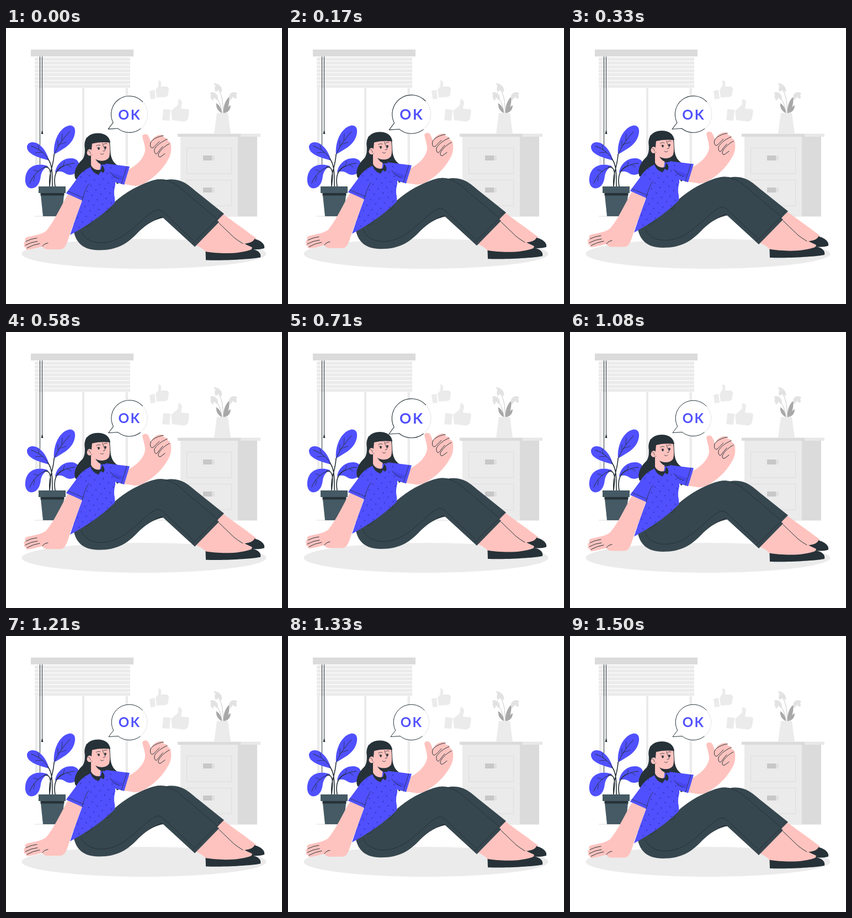
An HTML page for the animation above (1540 ms loop, 500x500 px).

```html
<!DOCTYPE html>
<html lang="en">
<head>
<meta charset="utf-8">
<title>OK</title>
<style>
  html, body { margin: 0; width: 100%; height: 100%; overflow: hidden; background: #fff; }
  svg { display: block; width: 100%; height: 100%; }
  .g1 { fill: #ebebeb; }
  .g2 { fill: #dbdbdb; }
  .blue { fill: #5050ff; }
  .skin { fill: #ffc3bf; }
  .pants { fill: #37474f; }
  .dark { fill: #263238; }
  .line { fill: none; stroke: #263238; stroke-width: 1; stroke-linecap: round; stroke-linejoin: round; }
  .thin { stroke-width: .8; }
  .stem { stroke-width: 1.6; }
  .pale { fill: none; stroke: #dcdcdc; stroke-width: 1; }
  text { font: 700 24px Lato, "Open Sans", sans-serif; letter-spacing: 2.5px; }
</style>
</head>
<body>
<svg viewBox="0 0 500 500">
  <defs>
    <pattern id="dots" width="16" height="18" patternUnits="userSpaceOnUse" patternTransform="translate(5 3) rotate(-8)">
      <g fill="#3434c4"><circle cx="4" cy="4" r="1.2"/><circle cx="12" cy="13" r="1.2"/></g>
    </pattern>
    <path id="torso" d="M157 251C142 256 132 266 126 277L109 300L138 313L128 340L116 375.500C143 361 175 340 197 317.500C199 309 193 303 198 285L198 262C192 250 184 247 176 248z"/>
  </defs>

  <!-- window -->
  <path class="g1" d="M53 109h4v139h-4zM138 109h4v139h-4zM216.500 109h4.500v139h-4.500z"/>
  <g id="slats" class="g1"></g>
  <path class="g2" d="M45 39H231V51.500H45z"/>
  <path class="line" d="M61.500 52V247M65.500 52V188"/>
  <path class="dark" d="M64.800 186h1.400l1.200 6h-3.800z"/>

  <!-- background thumbs -->
  <g class="g1">
    <path d="M260 114l9-2 2 16-9 1z"/>
    <path d="M271 112l4-5c2-4 1-8 1-12q5 0 5.500 5l-1 6 10.500 0q4 1 4 5l-1.500 10q-1.500 4-5.500 4l-15 1z"/>
    <path d="M285 147l13 1-2 20-13-1z"/>
    <path d="M299 150l11-9c3-5 1-9 3-12q5 0 6 6l-2 11 12 1q4 1 2.500 6l-1.500 10q-2 6-8 6.500l-21-2.500z"/>
  </g>

  <!-- cabinet -->
  <path class="pale" d="M52 341H455"/>
  <path class="g1" d="M316 197H420V341H316z"/>
  <path class="g2" d="M420 197H455V341H420zM311 191.500H425V197H311z"/>
  <path fill="#e8e8e8" d="M425 191.500H461V197H425z"/>
  <g id="drawer">
    <path class="pale" d="M327.500 217.500H408.500V264H327.500z"/>
    <path fill="#c7c7c7" d="M357 231h16v9h-16z"/>
    <path fill="#e0e0e0" d="M373 231h5v9h-5z"/>
  </g>
  <use href="#drawer" y="58"/>

  <!-- vase -->
  <g fill="none" stroke="#c7c7c7">
    <path d="M393 155C394 136 391 118 383 109M391 155C390 140 385 128 377 124M396 155C398 140 402 130 411 122"/>
  </g>
  <g fill="#a8a8a8">
    <path d="M394 154C393 143 397 131 404 125C406 135 402 147 396 154z"/>
    <path d="M391 154C384 151 380 144 381 136C387 140 391 147 391 154z"/>
    <path d="M397 154C398 147 402 142 407 140C407 147 403 152 397 154z"/>
  </g>
  <g fill="#e3e3e3" stroke="#d4d4d4" stroke-width=".6">
    <path d="M377 101C382 100 388 104 390 109C391 113 391 115 390 116C387 114 386 111 385 108C385 112 383 114 380 115C378 112 379 107 380 104z"/>
    <path d="M370 118C375 115 381 118 383 124C384 127 383 129 382 130C379 128 377 125 376 122C377 126 376 129 374 131C371 128 371 123 372 120z"/>
    <path d="M419 119C414 115 407 117 405 122C404 126 405 128 406 130C409 128 411 125 411 122C412 126 414 128 417 127C418 124 417 121 415 120z"/>
  </g>
  <path class="g1" d="M382 154H402L407 191.500H377z"/>

  <ellipse class="g1" cx="250" cy="409" rx="221.500" ry="27"/>

  <!-- plant -->
  <g class="blue">
    <path d="M87 229C85 205 97 180 115 176.500C127 176 127 189 122 200C116 213 104 219 87 229z"/>
    <path d="M78 240C60 235 37 229 38 214.500C40 205 53 205 61 212C70 219 75 229 78 240z"/>
    <path d="M77 251C66 245 44 245 37 263C32 277 36 290 46 290.500C58 290 62 278 63 268C65 258 70 253 77 251z"/>
    <path d="M89 262C91 247 103 236 117 236C130 236 135 244 131 256C127 267 114 268 107 263C100 259 95 259 89 262z"/>
  </g>
  <path class="line stem" d="M79 287C77 262 86 252 87 229M84 287C84 262 84 248 76 237M79 287C81 270 84 250 70 252M89 287C86 270 90 256 104 250"/>
  <path class="line" d="M87 230C94 213 103 201 115 188M77 238C70 226 58 218 46 214M72 252C59 256 49 267 43 281M102 251Q112 246 124 245"/>
  <path class="line thin" d="M94 214v-10M101 204l1-12M96 211l13-4M66 225l-13 1M60 220l-2-9M59 260l-9-3M52 268l-2 9M104 249l2-7M110 247l8 5"/>
  <path fill="#455a64" d="M59 287h49v12H59zM63 303h42l-4 38H67z"/>
  <path class="dark" d="M62.500 299h43v4.500h-43z"/>

  <g id="woman">
    <!-- hair behind -->
    <path class="dark" d="M146 199C139 212 147 226 139 238C128 248 121 262 126 274L150 280L196 274L201 283L204 282C200 272 198 264 203 250C195 245 191 238 189.500 228L188 204L170 196z"/>

    <!-- raised arm -->
    <path class="skin" d="M222 257C235 250 250 238 252 222C252 212 248 204 247 196Q250 190.500 256.500 194C260 199 261 203 262.500 207C266 198 275 193 282 194Q286 195 286 199Q292 198 293.500 205Q299 207 299 214C300 224 298 232 293 240C286 253 273 267 261 275C250 283 242 287 233 286.500L212 283z"/>
    <path class="line" d="M285 195.500C275 197 265 202 262 208Q260 216 264.500 218Q268 217 271 213L278 206M292 202C282 206 273 213 269 220Q268 227 272 229Q275 227 278 222L284 215M296 210C288 214 280 221 276 229Q275 235 280 234L288 228"/>

    <!-- far leg -->
    <path class="skin" d="M380 349L394 338L424 360C436 368 445 376 453 381C450 390 438 392 428 391L412 386z"/>
    <path class="dark" d="M426 392C440 391 448 388 450 382.500C461 385 470 392 468 399.500C460 402 450 402 440 401z"/>
    <path class="pants" d="M258 280C268 275 280 273 288 276C302 273 314 275 324 281C334 287 342 295 350 301L395 337L380 352L280 342L246 361z"/>
    <path class="dark" d="M240 369C252 354 266 345 284 340L287 344C269 347 256 355 240 369z"/>

    <!-- near leg -->
    <path class="skin" d="M342 393L385 352L412 379C422 387 434 392 446 398C444 409 420 410 395 410L362 408C361 402 352 398 342 393z"/>
    <path class="line" d="M386 354L413 380Q419 385 429 391"/>
    <path class="dark" d="M361.500 405.500C384 409.500 424 411 446 401C457 403 463 409 461 416C440 420 390 422 362 421z"/>
    <path class="pants" d="M123 370C127 389 140 403 168 403C204 403 221 390 240 370C254 357 266 348 282 342L342 397L386 352L318 290L288 275C270 272 252 281 230 292Q212 302 195 317C170 337 145 356 123 370z"/>
    <path class="line" d="M136 368C144 391 178 397 209 379C236 362 255 338 270 331Q277 327 284 333L339 385M288 276Q301 279 312 287L384 348M338 391L381 349M385 342L391 336"/>
    <path class="line thin" d="M143 361Q155 358 158 347M181 333Q190 333 190 325"/>

    <!-- torso -->
    <use href="#torso" class="blue"/>
    <path class="blue" d="M180 246L224 251.500L214 284.500L193 278L186 264z"/>
    <path fill="#3636cc" d="M190 262L212 270L209 276L194 271z" opacity=".4"/>
    <use href="#torso" fill="url(#dots)"/>
    <path class="line thin" d="M219 251L209 283M188 261Q194 270 205 274"/>

    <!-- supporting arm -->
    <path class="skin" d="M112 302L138 311C130 336 121 358 115 376C110 392 107 401.500 98 401.500H74C70 401 67 399 66 396C58 398 48 401 40 402C36 402 35 400 37 398C33 398 31 396 34 393C31 391 32 388 36 386C33 384 34 380 40 379C52 376 64 375 73 368C88 350 100 322 112 302z"/>
    <path class="line" d="M36 387Q46 382 56 381M35 394Q46 388 57 387M38 399Q49 393 61 391M66 396Q69 391 76 390"/>
    <path class="blue" d="M128 275L109 300L138 313L151 282z"/>
    <path class="line thin" d="M112 296L140 308M138 313C141 300 145 290 150 283"/>

    <!-- head -->
    <path class="skin" d="M154 230L172 240L171 252C171 262 160 262 154 250z"/>
    <path class="dark" d="M154 249C158 257 166 259 172 257L174 249C179 253 180 260 176 263L172 260L168 266C161 265 155 259 153 252z"/>
    <path class="dark" d="M162 238Q167 246 172 247L173 240z"/>
    <path class="skin" d="M154 207L186 203C188.500 216 189 228 186.500 235C182 242 171 242.500 164 239L156 233z"/>
    <ellipse class="skin" cx="151.500" cy="226" rx="5" ry="6"/>
    <path class="dark" d="M144 222C138 202 150 191 166 191C180 191 188 198 189 208C178 207 167 207 156 210L155 220C151 218 147 220 147 226z"/>
    <path class="line thin" d="M149 223Q152 222 153 228M163.500 214Q167 211 171 213M177 211Q180 208.500 183 210M175 209C175 215 181 220 179 223L176 223.500M171 228Q174 231 177 228"/>
    <ellipse class="dark" cx="168" cy="219" rx="1.600" ry="2.200"/>
    <ellipse class="dark" cx="180" cy="217.500" rx="1.600" ry="2.200"/>
    <path class="line thin" d="M165 217.500Q167.500 216 170 217.500M177.500 216Q180 214.500 182 216"/>
  </g>

  <g id="bubble">
    <path fill="#fff" d="M203 181.300L186 182.500L194.700 171A32.300 32.300 0 1 1 203 181.300z"/>
    <path class="line" d="M247 134.200A32.300 32.300 0 0 0 194.700 171L186 182.500L203 181.300A32.300 32.300 0 0 0 243 182"/>
    <path class="line" d="M247 134.200A32.300 32.300 0 0 1 243 182" stroke-dasharray="1 3" style="stroke-width:.3"/>
    <text class="blue" x="203.700" y="165.300">OK</text>
  </g>
</svg>
<script>
  const LOOP = 1540, CYCLE = 1500, LEAD = 35;
  const $ = id => document.getElementById(id);

  $("slats").innerHTML = Array.from({ length: 8 }, (_, i) =>
    `<rect x="52" y="${53.5 + i * 7}" width="173" height="5.8"/>`).join("");

  // Two beats of 10 % growth, then rest.
  const beats = [[0, 1], [.1, 1.1], [.3, 1], [.4, 1], [.5, 1.1], [.6, 1], [1, 1]];

  function lerpKeys(keys, p) {
    const i = Math.max(1, keys.findIndex(([at]) => at >= p));
    const [a, u] = keys[i - 1], [b, v] = keys[i];
    return u + (v - u) * (p - a) / (b - a);
  }

  function draw(now) {
    const p = Math.min(1, (now % LOOP + LEAD) / CYCLE);
    const lift = 10 * (1 - Math.abs(1 - 2 * p));
    $("woman").setAttribute("transform", `translate(0 ${-lift})`);
    $("bubble").setAttribute("transform",
      `translate(221 156.5) scale(${lerpKeys(beats, p)}) translate(-221 -156.5)`);
    requestAnimationFrame(draw);
  }
  draw(0);
</script>
</body>
</html>
```
